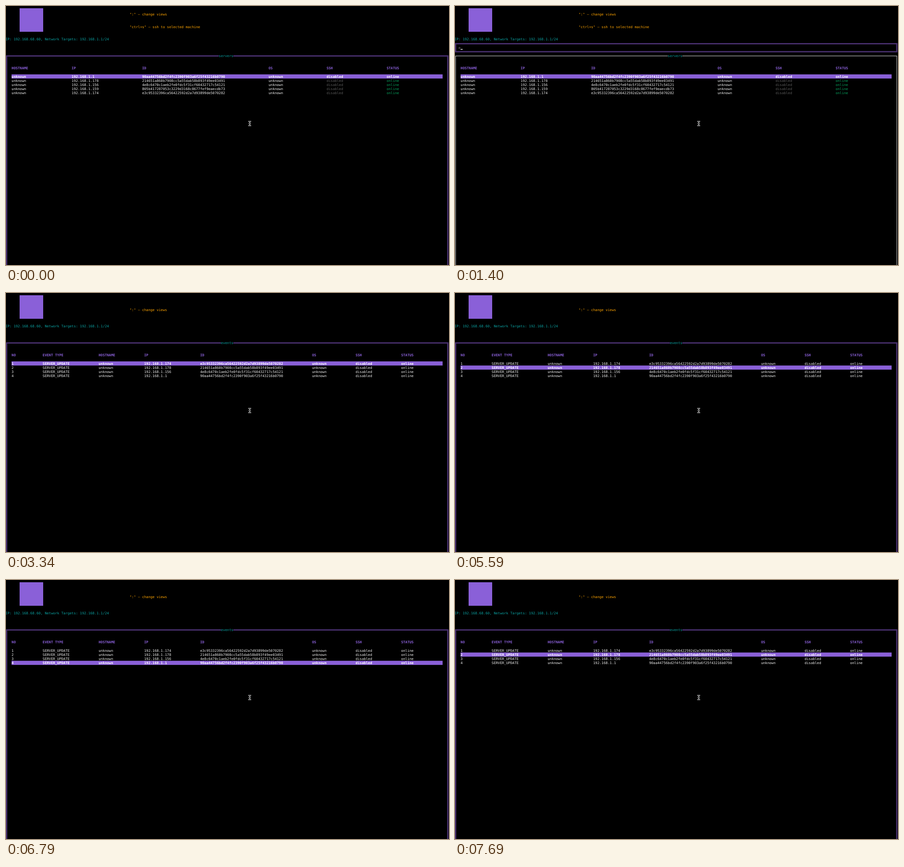
These frames come from a looping animation (977x573 px, 7990 ms). An HTML page with a canvas:

```html
<!DOCTYPE html>
<html lang="en">
<head>
<meta charset="utf-8">
<title>Server monitor</title>
<style>
  html, body { margin: 0; width: 100%; height: 100%; overflow: hidden; background: #000; }
  canvas { display: block; width: 977px; height: 573px; }
</style>
</head>
<body>
<canvas id="stage" width="977" height="573"></canvas>
<script>
const ctx = document.getElementById('stage').getContext('2d');
const LOOP = 7990;

// Terminal grid
const CELL_W = 4.57, CELL_H = 9.14;
const colX = c => c * CELL_W - 1.4;
const rowY = r => r * CELL_H - 4.1;
const midY = r => rowY(r) + CELL_H / 2;
const LEFT = 1.4, RIGHT = 974.4;

const FONT = '7.59px "DejaVu Sans Mono", monospace';
const C = {
  purple: '#8a60d8', border: '#49306f', teal: '#0ba3a3', orange: '#ffa500',
  white: '#f2f2f2', line: '#dcdcdc', gray: '#595959', hint: '#777', green: '#06a05c'
};

const HINT = 'Enter the view to change to (servers or events)';
const COMMAND = 'events';
const KEY_TIMES = [1400, 1550, 2000, 2150, 2300, 2590];
const OPEN_AT = 500, SWITCH_AT = 3340;
// [time, selected row] in the events view
const MOVES = [[SWITCH_AT, 0], [5590, 1], [6640, 2], [6790, 3], [7540, 2], [7690, 1]];

const HOSTS = [
  ['192.168.1.1', '90aa44756bd2f4fc2390f903a6f25f43216b0790'],
  ['192.168.1.178', '214651a860b7908cc5a55dab58b893f49ee03491'],
  ['192.168.1.156', '4e8c6470c1aeb2fe0fdc5f31cf60432717c54121'],
  ['192.168.1.159', '805b417287053c3229d3168c8677fef9eaecdb73'],
  ['192.168.1.174', 'e3c95332396ca56422592d2a7d93899de5070282']
];

const SERVERS = {
  title: 'servers',
  cols: [3, 32, 66, 127, 155, 184],
  head: ['HOSTNAME', 'IP', 'ID', 'OS', 'SSH', 'STATUS'],
  colors: { 4: C.gray, 5: C.green },
  rows: HOSTS.map(([ip, id]) => ['unknown', ip, id, 'unknown', 'disabled', 'online'])
};

const EVENTS = {
  title: 'events',
  cols: [3, 18, 45, 67, 94, 148, 169, 191],
  head: ['NO', 'EVENT TYPE', 'HOSTNAME', 'IP', 'ID', 'OS', 'SSH', 'STATUS'],
  colors: {},
  rows: [4, 1, 2, 0].map((h, i) =>
    [String(i + 1), 'SERVER_UPDATE', 'unknown', ...HOSTS[h], 'unknown', 'disabled', 'online'])
};

function rect(x, y, w, h, color) {
  ctx.fillStyle = color;
  ctx.fillRect(x, y, w, h);
}

function print(str, col, row, color, bold) {
  ctx.font = (bold ? 'bold ' : '') + FONT;
  ctx.fillStyle = color;
  const y = midY(row) + 2.7;
  [...str].forEach((ch, i) => {
    if (ch !== ' ') ctx.fillText(ch, colX(col + i), y);
  });
}

// Box outline centred on the border cells
function frame(top, bottom, width, color) {
  ctx.strokeStyle = color;
  ctx.lineWidth = width;
  ctx.strokeRect(LEFT, top, RIGHT - LEFT, bottom - top);
}

function header(view) {
  rect(30, 5, 52, 52, C.purple);
  print('IP: 192.168.68.60, Network Targets: 192.168.1.1/24', 0, 8, C.teal);
  if (view === SERVERS) {
    print('":" – change views', 60, 2, C.orange);
    print('"ctrl+s" – ssh to selected machine', 60, 5, C.orange);
  } else {
    print('":" – change views', 60, 4, C.orange);
  }
}

function table(view, selected, focused) {
  const { title, cols, head, rows, colors } = view;
  if (focused) frame(110.5, 600, 2.8, C.border);
  else frame(110.5, 600, 1, C.line);

  const start = Math.floor((214 - title.length) / 2);
  rect(colX(start), rowY(12), title.length * CELL_W, CELL_H, '#000');
  print(title, start, 12, C.teal);

  head.forEach((name, i) => print(name, cols[i], 15, C.purple, true));
  rows.forEach((cells, r) => {
    const active = r === selected;
    if (active) rect(colX(3), rowY(17 + r), 950.6, CELL_H, C.purple);
    cells.forEach((cell, i) => {
      const color = active ? '#fff' : colors[i] || C.white;
      print(cell, cols[i], 17 + r, color, active);
    });
  });
}

function prompt(t) {
  const typed = KEY_TIMES.filter(k => t >= k).length;
  frame(midY(9) + 0.7, midY(11) + 0.1, 2.8, C.border);
  print(typed ? COMMAND.slice(0, typed) : HINT, 2, 10, C.hint);
  rect(colX(2 + typed), 95.2, CELL_W, 1.4, '#fff');
}

function pointer(x, y) {
  const shape = new Path2D();
  for (const s of [-1, 1]) {
    shape.moveTo(x - 3.2, y + s * 5);
    shape.lineTo(x + 3.2, y + s * 5);
    shape.moveTo(x - 2.6, y + s * 5);
    shape.lineTo(x, y + s * 2);
    shape.lineTo(x + 2.6, y + s * 5);
  }
  shape.moveTo(x + 1.7, y);
  shape.arc(x, y, 1.7, 0, Math.PI * 2);
  ctx.strokeStyle = '#e4e4e4';
  ctx.lineWidth = 1;
  ctx.stroke(shape);
}

function draw(t) {
  rect(0, 0, 977, 573, '#000');
  const view = t < SWITCH_AT ? SERVERS : EVENTS;
  const typing = t >= OPEN_AT && t < SWITCH_AT;
  const selected = MOVES.reduce((row, [at, next]) => t >= at ? next : row, 0);
  header(view);
  table(view, selected, !typing);
  if (typing) prompt(t);
  pointer(537.5, 260);
}

ctx.textRendering = 'geometricPrecision';
const began = performance.now();
function tick() {
  draw((performance.now() - began) % LOOP);
  requestAnimationFrame(tick);
}
tick();
</script>
</body>
</html>
```
